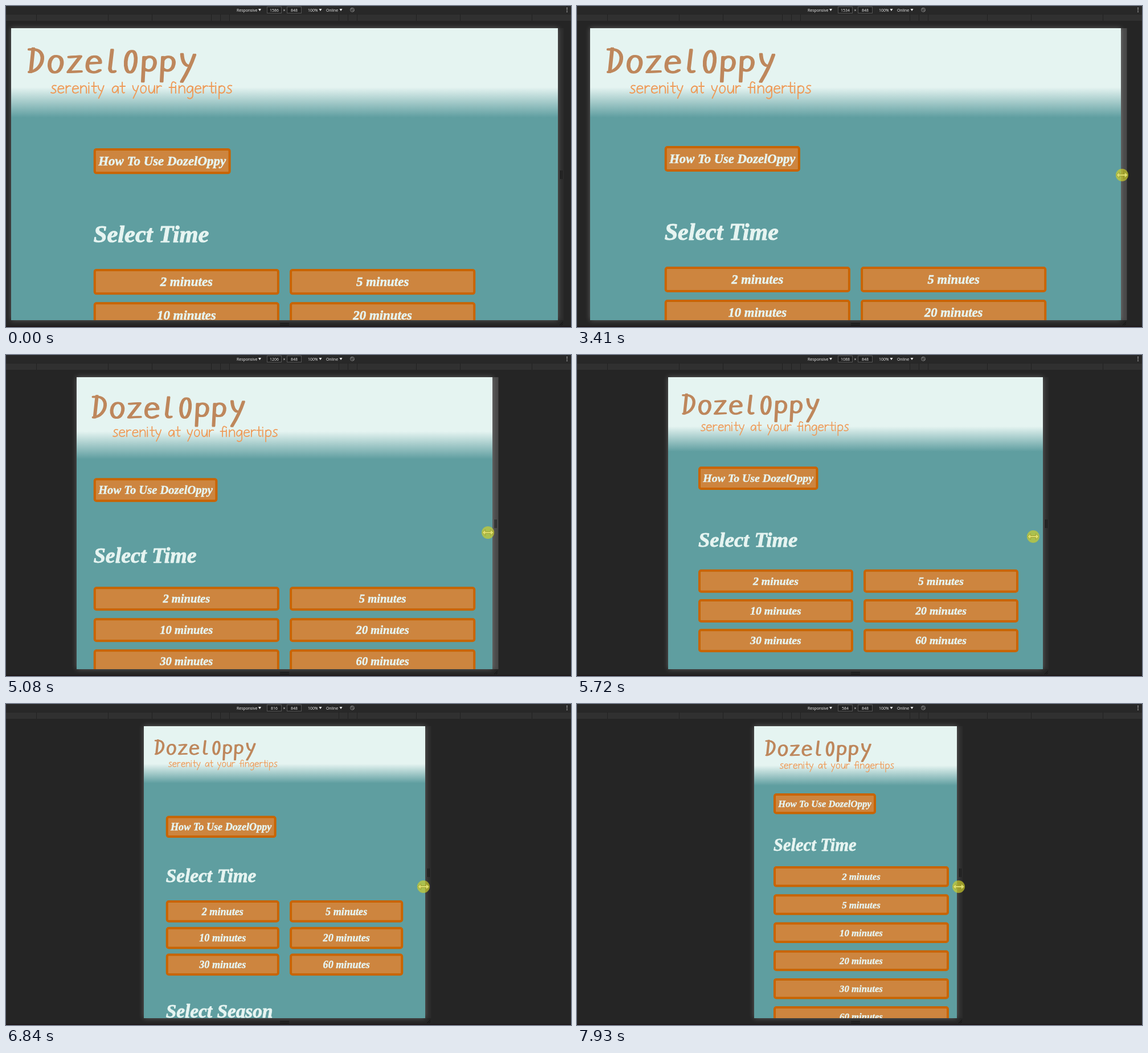
Recreate the animation shown at these times as an HTML page. Size 992 px wide and 564 px high, loop 8000 ms.

```html
<!DOCTYPE html>
<html lang="en">
<head>
<meta charset="utf-8">
<title>Responsive page preview</title>
<style>
  html, body { margin: 0; width: 100%; height: 100%; overflow: hidden; background: #252525; }
  svg { display: block; width: 100vw; height: 100vh; }
  .tool { font: 6.9px "Open Sans", sans-serif; fill: #f0f0f0; }
  .script { font-family: "Liberation Serif", serif; font-weight: bold; font-style: italic;
            fill: #e6f4f1; stroke: #e6f4f1; stroke-width: .025em; stroke-linejoin: round; }
  .btn { fill: #cd853f; stroke: #c96400; stroke-width: 4; }
  .pen { fill: none; stroke-linecap: round; stroke-linejoin: round; }
  #sheet { filter: drop-shadow(0 0 5px #ffffff44); }
</style>
</head>
<body>
<svg id="stage" viewBox="0 0 992 564">
  <defs>
    <linearGradient id="fade" x2="0" y2="1">
      <stop offset=".66" stop-color="#e5f4f1"/>
      <stop offset="1" stop-color="#5f9ea0"/>
    </linearGradient>
    <clipPath id="clip"><rect id="clipBox" y="39" height="513"/></clipPath>
  </defs>
  <rect width="992" height="564" fill="#252525"/>
  <rect width="992" height="14" fill="#282828"/>
  <rect y="15" width="992" height="11" fill="#303030"/>
  <g id="ruler" stroke="#222"></g>
  <rect y="562.5" width="992" height="1.5" fill="#1c1416"/>

  <g class="tool">
    <rect x="458.5" y="1.5" width="25" height="11" fill="#202020" stroke="#555"/>
    <rect x="493.5" y="1.5" width="25" height="11" fill="#202020" stroke="#555"/>
    <text x="405" y="9.5">Responsive</text>
    <text id="size" x="471" y="9.5" text-anchor="middle"></text>
    <text x="488.5" y="10" text-anchor="middle">×</text>
    <text x="506" y="9.5" text-anchor="middle">848</text>
    <text x="530" y="9.5">100%</text>
    <text x="562" y="9.5">Online</text>
    <path d="M443 5h5l-2.500 4zM549.500 5h5l-2.500 4zM585.500 5h5l-2.500 4z"/>
    <g fill="none" stroke="#8a8a8a" stroke-width=".9">
      <circle cx="608" cy="6.800" r="3.500"/>
      <path d="M605.500 5l4 4.500l1.500-1.500l-4-4.500z"/>
    </g>
    <path d="M984.300 3h1.400v1.400h-1.400zM984.300 6.200h1.400v1.400h-1.400zM984.300 9.400h1.400v1.400h-1.400z"/>
  </g>

  <rect id="band" y="39" width="10.500" height="513"/>
  <rect id="sheet" y="39" height="513" fill="#5f9ea0"/>
  <g id="page" clip-path="url(#clip)">
    <rect id="header" y="39" fill="url(#fade)"/>
    <g id="logo" class="pen">
      <g id="brand" stroke="#be875c" role="img" aria-label="DozelOppy"></g>
      <g id="tagline" stroke="#ee9b59" stroke-width="2" role="img" aria-label="serenity at your fingertips"></g>
    </g>
  </g>
  <g stroke="#111">
    <path d="M481 557.500h16M481 560.500h16"/>
    <path id="grip" d="M4.500 289v15M7 289v15"/>
    <path id="corner" d="M3 561l6-6M6 561l3-3"/>
  </g>

  <path id="arrow" d="M0 0v14l3.300-3l2.200 5l2.200-1l-2.200-4.800h4.500z" fill="#fff" stroke="#222" stroke-width=".8"/>
  <g id="resize">
    <path d="M-10 0l5.500-5v3.500h9v-3.500l5.500 5l-5.500 5v-3.500h-9v3.500z" fill="#fff" stroke="#222" stroke-width=".8"/>
    <circle id="press" r="11" fill="#d0d02a" opacity=".68"/>
  </g>
</svg>

<script>
const LOOP = 8000, MID = 489, ZOOM = 0.605;
const $ = id => document.getElementById(id);

function add(parent, tag, attrs = {}, text = "") {
  const el = document.createElementNS("http://www.w3.org/2000/svg", tag);
  set(el, attrs);
  el.textContent = text;
  return parent.appendChild(el);
}
function set(el, attrs) {
  for (const key in attrs) el.setAttribute(key, attrs[key]);
}
const move = (el, x, y) => set(el, { transform: `translate(${x} ${y})` });

// Rows of [position, ...values], linear in between, held at both ends.
function track(rows, at) {
  if (at <= rows[0][0]) return rows[0].slice(1);
  for (let i = 1; i < rows.length; i++) {
    const a = rows[i - 1], b = rows[i];
    if (at < b[0]) {
      const f = (at - a[0]) / (b[0] - a[0]);
      return a.slice(1).map((v, j) => v + (b[j + 1] - v) * f);
    }
  }
  return rows[rows.length - 1].slice(1);
}

// Time, half the visible page width, width shown in the toolbar
const DRAG = [
  [2770, 479.5, 1586], [3410, 466, 1534], [3540, 459.5, 1518], [4380, 434, 1434],
  [4460, 421.5, 1394], [5250, 349, 1154], [5720, 329, 1088], [6040, 286, 946],
  [6840, 247, 816], [6900, 245, 810], [7770, 203, 670], [7930, 178, 584]
];
// Time, x, y
const MOUSE = [
  [360, 800, 562], [1140, 945, 320], [1500, 968, 293], [2080, 968, 293], [2310, 974, 293],
  [2770, 974, 293], [3410, 957, 297], [4460, 890, 305], [5720, 801, 319],
  [6840, 733, 321], [7930, 670, 321]
];
// Page width, distance from the help button to the first row
const DROP = [[588, 128], [816, 148.5], [1088, 181], [1394, 207], [1520, 212]];

const BREAKS = [
  { min: 1200, width: 670.5, top: 109.6, gap: 13, cols: 2, shift: 0 },
  { min: 992, width: 562, top: 99.7, gap: 11.2, cols: 2, shift: 5 },
  { min: 768, width: 416.5, top: 124.3, gap: 8.2, cols: 2, shift: 0 },
  { min: 0, width: 308, top: 105, gap: 12.7, cols: 1, shift: 10 }
];

// Pen strokes on a baseline at 0 with an x-height of about 13
const stem = "M1-13V0", bowl = "M11-10C6-16 0-9 1-4S9 1 11-11";
const GLYPHS = {
  s: "M9-13C3-15 0-10 4-8S10-3 7-1 2 0 0-1",
  e: "M1-7L11-8C11-14 2-15 1-7S7 1 11-2",
  r: stem + "M1-8C3-12 6-14 9-12",
  n: stem + "M1-8C5-15 11-14 11-7V0",
  i: stem + "M1-17v-1",
  t: "M4-19V-3Q5 1 8-1M0-12H9",
  y: "M1-13Q2-5 6-4M11-13Q8-2 2 9",
  a: bowl + "V0",
  g: bowl + "V3C11 10 5 11 2 8",
  o: "M6-13C-1-13-1 0 5 0S13-13 6-13",
  u: "M1-13C0-4 2 0 5 0S11-5 11-13V0",
  f: "M11-18C6-22 4-18 4-13V0M0-10H10",
  p: "M1-12V10M1-9C4-15 12-13 11-6S4 1 1-2"
};
const BRAND_GLYPHS = {
  D: "M2-19L1 0M-1-18C14-21 12-2 0 0",
  z: "M1-12L10-13L1 0L11-1",
  l: "M5-18L4-3Q5 1 8-1",
  O: "M6-17C0-17 0 0 5 0S11-17 6-17"
};
const ADVANCE = { s: 11.4, r: 11.4, i: 5.9, t: 10.4, f: 10.4, " ": 11 };

function drawLogo() {
  [..."DozelOppy"].forEach((c, i) => {
    const scale = c === "p" ? 1.95 : 2.2;
    // Two offset strokes make a flat brush.
    for (const nib of [0, 2.6]) {
      add($("brand"), "path", {
        d: BRAND_GLYPHS[c] || GLYPHS[c],
        "stroke-width": 4 / scale,
        transform: `translate(${40 + 33 * i + nib} ${i < 6 ? 116 : 113}) rotate(3) scale(${scale})`
      });
    }
  });
  let x = 79;
  for (const c of "serenity at your fingertips") {
    if (c !== " ") add($("tagline"), "path", { d: GLYPHS[c], transform: `translate(${x} 153)` });
    x += ADVANCE[c] || 14.2;
  }
}

function makeButton(label) {
  const box = add($("page"), "rect", { class: "btn", rx: 3 });
  const text = add($("page"), "text", { class: "script", "text-anchor": "middle" }, label);
  return (x, y, w, h, size) => {
    set(box, { x: x + 2, y: y + 2, width: w - 4, height: h - 4 });
    set(text, { x: x + w / 2, y: y + h * 0.665, "font-size": size });
  };
}

for (const d of [96, 112, 128, 232, 309, 435])
  for (const x of [MID - d, MID + d]) add($("ruler"), "path", { d: `M${x - 0.5} 15v11` });
drawLogo();
const help = makeButton("How To Use DozelOppy");
const choices = [2, 5, 10, 20, 30, 60].map(n => makeButton(n + " minutes"));
const [timeTitle, seasonTitle] = ["Select Time", "Select Season"].map(
  s => add($("page"), "text", { class: "script" }, s));

function layout(half) {
  const width = half * 2 / ZOOM;
  const left = Math.floor(MID - half), right = Math.ceil(MID + half);
  const span = { x: left, width: right - left };
  const logo = Math.min(1, (width - 60) / 1260 * (width < 768 ? 1.5 : 1));
  set($("sheet"), span);
  set($("clipBox"), span);
  set($("header"), { ...span, height: 15 + 142 * logo });
  set($("logo"), {
    transform: `translate(${left + 3.5} 46) scale(${logo}) translate(-12.5 -46)`
  });

  const bp = BREAKS.find(b => width >= b.min);
  const x = MID + bp.shift - bp.width / 2;
  const size = 13.1 + 0.0062 * width, high = 31.2 + 0.009 * width;
  const titleSize = 23.5 + 0.012 * width;
  const top = bp.top + 0.0885 * width;
  const [drop] = track(DROP, width);
  help(x, top, 144 + 0.0611 * width, high, size);
  set(timeTitle, { x, y: top + drop * 0.76 + 4, "font-size": titleSize });

  const gutter = 18.2;
  const colWidth = (bp.width - gutter * (bp.cols - 1)) / bp.cols;
  choices.forEach((place, i) => {
    const row = Math.floor(i / bp.cols), col = i % bp.cols;
    place(x + col * (colWidth + gutter), top + drop + row * (high + bp.gap), colWidth, high, size);
  });
  const rows = choices.length / bp.cols;
  set(seasonTitle, {
    x, y: top + drop + rows * (high + bp.gap) - bp.gap + 0.09 * width, "font-size": titleSize
  });
  return right;
}

function draw(t) {
  const [half, shown] = track(DRAG, t);
  const right = layout(half);
  $("size").textContent = 2 * Math.round(shown / 2);
  set($("band"), { x: right, fill: t >= 2770 && t < 5300 ? "#484848" : "#2b2b2b" });
  move($("grip"), right, 0);
  move($("corner"), right, 0);

  const [mx, my] = track(MOUSE, t);
  const dragging = t >= 2770, atEdge = dragging || mx > 958;
  move($("arrow"), mx, my);
  move($("resize"), mx, my);
  $("arrow").style.display = t >= 360 && !atEdge ? "" : "none";
  $("resize").style.display = atEdge ? "" : "none";
  $("press").style.display = dragging ? "" : "none";
}

const start = performance.now();
function tick() {
  draw((performance.now() - start) % LOOP);
  requestAnimationFrame(tick);
}
tick();
</script>
</body>
</html>
```
